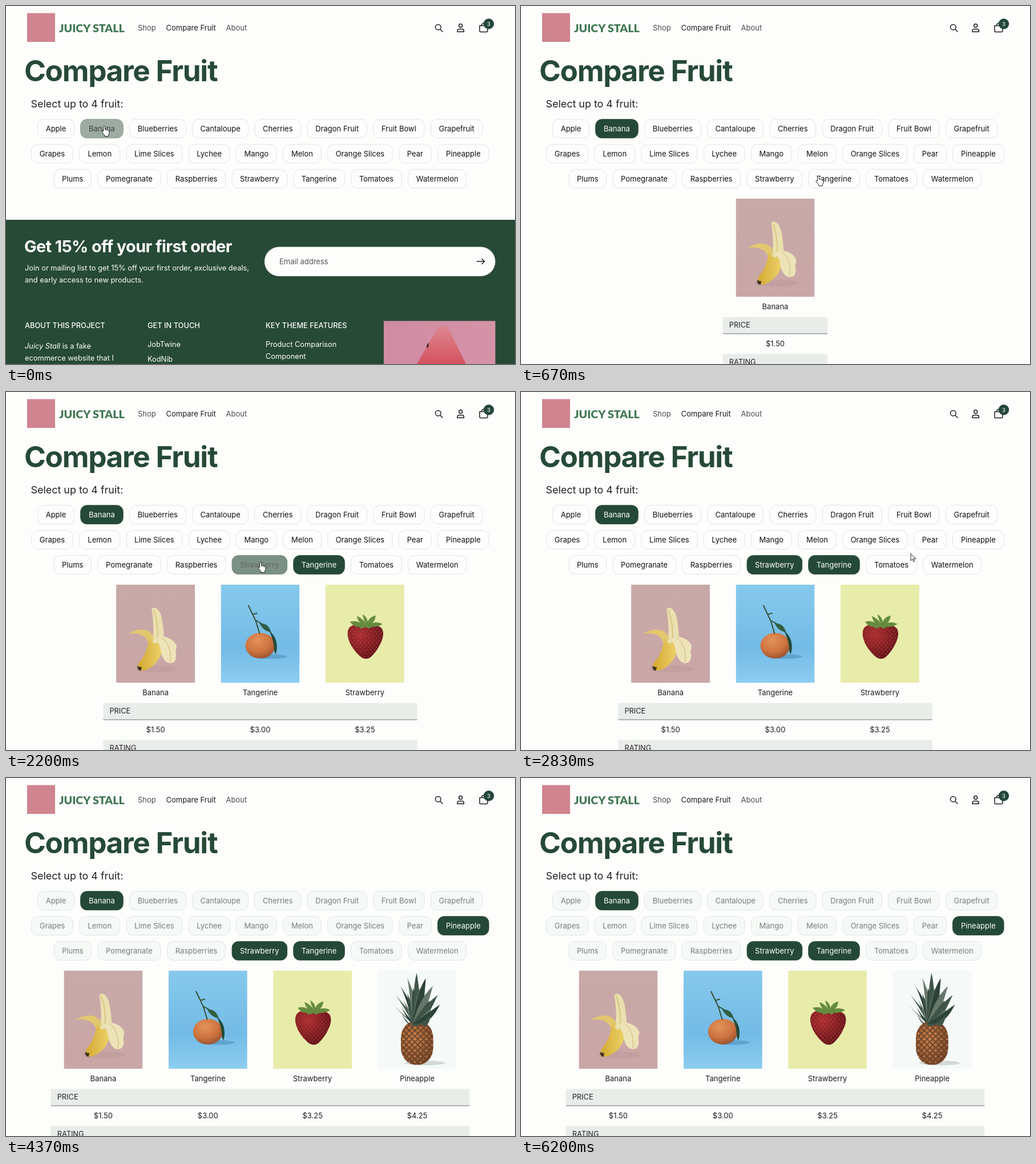
Animation, 892 px wide and 628 px high, one loop 6230 ms. Source, as an HTML page:

```html
<!DOCTYPE html>
<html lang="en">
<head>
<meta charset="utf-8">
<title>Compare Fruit</title>
<style>
  html, body { margin: 0; width: 100%; height: 100%; overflow: hidden; background: #fdfdfb; }
  svg { display: block; width: 892px; height: 628px; font: 12.8px Inter, Arial, sans-serif; font-optical-sizing: none; }
  .brand { font: 900 19.6px Lato, sans-serif; fill: #417854; }
  .bold { font-weight: 700; letter-spacing: -.02em; }
  .title { font-weight: 700; letter-spacing: -.025em; }
  .mid { text-anchor: middle; }
  .caps { font-weight: 500; }
  .line { fill: none; stroke: #1c1c1c; stroke-width: 1.5; stroke-linecap: round; stroke-linejoin: round; }
</style>
</head>
<body>
<svg id="stage" viewBox="0 0 892 628">
  <defs>
    <linearGradient id="rose" x2="0" y2="1"><stop stop-color="#c7a9a7"/><stop offset="1" stop-color="#caa6a6"/></linearGradient>
    <linearGradient id="sky" x2="0" y2="1"><stop stop-color="#86c9ec"/><stop offset=".65" stop-color="#73bbe6"/><stop offset="1" stop-color="#8dcdf0"/></linearGradient>
    <linearGradient id="pink" x2="1" y2="0"><stop stop-color="#cf8ba1"/><stop offset="1" stop-color="#d593a8"/></linearGradient>
    <linearGradient id="flesh" x2="0" y2="1"><stop stop-color="#dc8790"/><stop offset="1" stop-color="#d5525f"/></linearGradient>
    <linearGradient id="peel" x2="1" y2="0"><stop stop-color="#d3a932"/><stop offset="1" stop-color="#ecd069"/></linearGradient>
    <radialGradient id="orange" cx=".4" cy=".3" r=".75"><stop stop-color="#e4925a"/><stop offset=".6" stop-color="#cd733f"/><stop offset="1" stop-color="#96502f"/></radialGradient>
    <radialGradient id="berry" cx=".35" cy=".3" r=".75"><stop stop-color="#ae2e30"/><stop offset="1" stop-color="#64131a"/></radialGradient>
    <radialGradient id="rind" cx=".4" cy=".4" r=".7"><stop stop-color="#c87b42"/><stop offset="1" stop-color="#7d4427"/></radialGradient>
    <pattern id="seeds" width="7" height="8" patternUnits="userSpaceOnUse"><path d="M2 1v1.4M5.5 5v1.4" stroke="#c27a62" stroke-width=".9"/></pattern>
    <pattern id="scales" width="10" height="10" patternUnits="userSpaceOnUse"><path d="M0 0l10 10M10 0L0 10" stroke="#5c3f2a" stroke-width="1.5"/><circle cx="5" cy="0" r="1.3" fill="#e0aa78"/></pattern>
  </defs>

  <rect width="892" height="628" fill="#fdfdfb"/>
  <rect x="37" y="12.5" width="49" height="50.5" fill="#d0848f"/>
  <text class="brand" x="93" y="46">JUICY STALL</text>
  <g font-size="13" fill="#4b4b4b">
    <text x="231" y="42.5">Shop</text>
    <text x="280.5" y="42.5" fill="#1b1b1b">Compare Fruit</text>
    <text x="385.5" y="42.5">About</text>
  </g>
  <g class="line">
    <circle cx="757.3" cy="37.2" r="4.8"/><path d="M761 41l4 4"/>
    <circle cx="796.7" cy="34.6" r="3"/><path d="M791 45.3v-1.5q0-3.3 3.3-3.3h4.8q3.3 0 3.3 3.3v1.5z"/>
    <path d="M830 34.6h14v9q0 2-2 2h-10q-2 0-2-2zM833.5 34.5q0-4 3.5-4t3.5 4"/>
  </g>
  <circle cx="846" cy="31.3" r="9.2" fill="#23483a"/>
  <text class="mid" x="846" y="34.8" font-size="9.6" fill="#fff">3</text>
  <text class="title" x="32" y="131.5" font-size="51.2" fill="#264a37">Compare Fruit</text>
  <text x="43.5" y="178" font-size="17.92" fill="#222">Select up to 4 fruit:</text>
  <g id="pills" class="mid" font-size="13"></g>

  <g id="footer" fill="#fff">
    <rect y="375" width="892" height="253" fill="#274a36"/>
    <text class="bold" x="32" y="432" font-size="28.8">Get 15% off your first order</text>
    <text x="33" y="464">Join or mailing list to get 15% off your first order, exclusive deals,</text>
    <text x="33" y="484.5">and early access to new products.</text>
    <rect x="453" y="422.5" width="404.5" height="51.5" rx="25.7" fill="#fdfdfb"/>
    <text x="479" y="452.5" fill="#555" font-size="13">Email address</text>
    <path class="line" d="M825.5 448h13M834 443.5l4.5 4.5-4.5 4.5"/>
    <g class="caps">
      <text x="33" y="564.5">ABOUT THIS PROJECT</text>
      <text x="248" y="564.5">GET IN TOUCH</text>
      <text x="455" y="564.5">KEY THEME FEATURES</text>
    </g>
    <text x="33" y="600.5"><tspan font-style="italic">Juicy Stall</tspan> is a fake</text>
    <text x="33" y="621.5">ecommerce website that I</text>
    <text x="248" y="598">JobTwine</text>
    <text x="248" y="624">KodNib</text>
    <text x="455" y="598">Product Comparison</text>
    <text x="455" y="619">Component</text>
    <rect x="662" y="552.5" width="195.5" height="76" fill="url(#pink)"/>
    <path d="M720 628L755 567q3-5 8-5h5q5 0 8 5L806 628z" fill="url(#flesh)"/>
    <path d="M737 599q0-6 4-8l-1 8z" fill="#3a2328"/>
  </g>

  <g id="table">
    <rect class="band" y="545.5" height="29" fill="#e9edea"/>
    <rect class="band" y="574.4" height="1" fill="#68716c"/>
    <rect class="band" y="610.5" height="18" fill="#e9edea"/>
    <g id="labels" fill="#222"><text x="11" y="564.3">PRICE</text><text x="11" y="628.5">RATING</text></g>
  </g>
  <g id="products" class="mid" font-size="13" fill="#1d1d1d"></g>
  <path id="cursor" fill="#fff" stroke="#222" stroke-width="1" stroke-linejoin="round"/>
</svg>
<script>
const LOOP = 6230, COLUMN = 183.4, CENTER = 445.5, GAP = 11.2, PILL_H = 32.8;
const $ = id => document.getElementById(id);

const rows = [
  [55.5, 198.8, 'Apple 64,Banana 74.5,Blueberries 99,Cantaloupe 98,Cherries 81,Dragon Fruit 104.5,Fruit Bowl 89.5,Grapefruit 90.5'],
  [44.5, 242.8, 'Grapes 73,Lemon 71,Lime Slices 98,Lychee 72,Mango 71,Melon 67,Orange Slices 113.5,Pear 57,Pineapple 89.5'],
  [84, 286.8, 'Plums 65.5,Pomegranate 110.5,Raspberries 102.5,Strawberry 96.5,Tangerine 89.5,Tomatoes 89,Watermelon 102']
];

// Long inner leaves alternate with short ones, tips bending outwards.
const leaves = Array.from({ length: 19 }, (_, i) => {
  const a = (i - 9) * .125, len = 88 - Math.abs(i - 9) * 3.4 - (i % 2 ? 0 : 22);
  const x = 68 + Math.sin(a) * len * .8, y = 92 - Math.cos(a) * len;
  const c = ['#3f5548', '#66786a', '#2d4238'][i % 3];
  return `<path d="M61 93Q${62 + (x - 68) * .4} ${y + 22} ${x} ${y}Q${74 + (x - 68) * .5} ${y + 30} 76 93z" fill="${c}"/>`;
}).join('');

const heart = 'M39 82q2-12 17-12 13 0 20 0 15-2 23 7 5 8-1 23-8 18-20 28-8 5-17-2-16-14-21-31-2-7-1-13z';
const rind = '<rect x="40.5" y="88" width="56.5" height="77" rx="26" ry="30"';

const art = {
  Banana: `<rect width="138" height="172" fill="url(#rose)"/>
    <ellipse cx="70" cy="148" rx="38" ry="6" fill="#b28e8f" opacity=".3"/>
    <path d="M62 43q2-4 8-2 9 6 11 24 4 24 2 43l-24 2q8-22 6-38 0-14-3-29z" fill="#eadfae"/>
    <path d="M65 44q10 24 7 60" fill="none" stroke="#d9c68a" stroke-width="2"/>
    <path d="M21 86q18-11 33-6 9 4 12 14l-8 18q-1-17-12-23-10-5-25-3z" fill="#e2c76f"/>
    <path d="M58 94q-3 23-13 36-9 10-6 17 4 6 14 2 17-8 24-23 4-10 1-28-10 12-20-4z" fill="url(#peel)"/>
    <path d="M70 98q3-9 13-7 16 3 22 14 2 4-1 12 3 13-3 19-7 4-14-1-8-8-9-20-1-10-8-17z" fill="#ede3b8"/>
    <path d="M80 93q17 12 15 43" fill="none" stroke="#dac58c" stroke-width="1.5"/>
    <path d="M37 143l8 2-2 6q-6-1-6-8z" fill="#44351d"/>`,
  Tangerine: `<rect width="138" height="172" fill="url(#sky)"/>
    <ellipse cx="86" cy="126" rx="30" ry="4" fill="#3f7fae" opacity=".45"/>
    <ellipse cx="69" cy="107" rx="26" ry="22.5" fill="url(#orange)"/>
    <path d="M48 36l13 27 7 23M56 52l8-2M60 62l14 8" fill="none" stroke="#385036" stroke-width="2"/>
    <path d="M68 68q16-1 20 16l-8-3q-8-4-12-13z" fill="#315f43"/>
    <path d="M84 80q10 8 13 19 3 13-1 23-3-4-3-15-2-14-9-27z" fill="#234a38"/>`,
  Strawberry: `<rect width="138" height="172" fill="#e8ecaa"/>
    <path d="${heart}" fill="url(#berry)"/>
    <path d="${heart}" fill="url(#seeds)"/>
    <path d="M71 68q-5-8-6-16 8 5 9 13 4-9 14-11-1 9-6 13 9-3 18 2-9 6-19 5-5 5-11 0-7 5-12 0-9 0-15-9 11-3 18 2-5-5-6-12 10 4 16 13z" fill="#668b40"/>`,
  Pineapple: `<rect width="138" height="172" fill="#f5faf8"/>
    <ellipse cx="82" cy="162" rx="36" ry="4" fill="#d3dad6"/>
    ${rind} fill="url(#rind)"/>${rind} fill="url(#scales)"/>${leaves}`
};

const picks = [
  { name: 'Banana', price: '$1.50', hover: -500, click: 110 },
  { name: 'Tangerine', price: '$3.00', hover: 665, click: 1000 },
  { name: 'Strawberry', price: '$3.25', hover: 1840, click: 2150 },
  { name: 'Pineapple', price: '$4.25', hover: 3100, click: 3350 }
];
const allPicked = picks[3].click;

// [time, x, y] of the pointer tip
const track = [
  [0, 172, 211], [230, 172, 211], [670, 521, 298], [800, 537, 304.5], [1550, 537, 304.5],
  [1950, 446, 299], [2450, 446, 299], [2830, 683, 283.5], [3200, 810, 251], [3850, 810, 251], [4300, 800, 640]
];
const HAND = 'M-1.5 1.2a1.5 1.5 0 0 1 3 0v5l1.2-.6 1.5.9 1.4-.3 1.2 1 1.3.1.7 1.2v4l-1.5 3v2h-6.5v-1.6l-4.7-6.2c-.6-1.4 1-2 1.9-1l.5.6z';
const ARROW = 'M0 0v12.5l3-2.8 2 4.6 2-.9-2-4.5h4z';

const clamp = v => Math.max(0, Math.min(1, v));
const smooth = v => v * v * (3 - 2 * v);
const ramp = (t, start) => smooth(clamp((t - start) / 150));
const mix = (a, b, k) => `rgb(${a.map((v, i) => Math.round(v + (b[i] - v) * k))})`;

const PAPER = [253, 253, 252], INK = [17, 17, 17], GREEN = [37, 73, 55], EDGE = [223, 227, 232];
const FADED = [246, 250, 247], FADED_INK = [117, 124, 120], WHITE = [255, 255, 255];

const pills = [];
for (const [start, y, list] of rows) {
  let x = start;
  for (const item of list.split(',')) {
    const [, name, size] = item.match(/(.+) ([\d.]+)/), w = +size;
    pills.push({ name, x, y, w, pick: picks.find(p => p.name === name) });
    x += w + GAP;
  }
}
$('pills').innerHTML = pills.map(p =>
  `<g><rect x="${p.x}" y="${p.y}" width="${p.w}" height="${PILL_H}" rx="11"/><text x="${p.x + p.w / 2}" y="${p.y + 21}">${p.name}</text></g>`).join('');
pills.forEach((p, i) => [p.box, p.label] = $('pills').children[i].children);

$('products').innerHTML = picks.map(p =>
  `<g><svg x="22.7" y="338" width="138" height="172">${art[p.name]}</svg>
   <text x="${COLUMN / 2}" y="532">${p.name}</text><text x="${COLUMN / 2}" y="597">${p.price}</text></g>`).join('');
const bands = document.querySelectorAll('.band');

function pointerAt(t) {
  const i = track.findIndex(k => k[0] > t);
  if (i < 0) return null;
  const [t0, x0, y0] = track[i - 1], [t1, x1, y1] = track[i];
  const k = smooth((t - t0) / (t1 - t0));
  return [x0 + (x1 - x0) * k, y0 + (y1 - y0) * k];
}

function drawPills(t) {
  const off = ramp(t, allPicked);
  for (const { pick, box, label } of pills) {
    const k = pick ? .45 * ramp(t, pick.hover) + .55 * ramp(t, pick.click) : off;
    box.setAttribute('fill', mix(PAPER, pick ? GREEN : FADED, k));
    box.setAttribute('stroke', mix(EDGE, pick ? GREEN : EDGE, k));
    label.setAttribute('fill', pick ? mix(INK, WHITE, k * k) : mix(INK, FADED_INK, k));
  }
}

function drawTable(t) {
  const count = picks.filter(p => t >= p.click).length;
  const left = CENTER - COLUMN * count / 2;
  $('footer').style.display = count ? 'none' : '';
  $('table').style.display = count ? '' : 'none';
  bands.forEach(b => { b.setAttribute('x', left); b.setAttribute('width', COLUMN * count); });
  $('labels').setAttribute('transform', `translate(${left})`);
  [...$('products').children].forEach((g, i) => {
    g.style.display = i < count ? '' : 'none';
    g.setAttribute('transform', `translate(${left + i * COLUMN})`);
  });
}

function drawCursor(t) {
  const at = pointerAt(t);
  $('cursor').style.display = at ? '' : 'none';
  if (!at) return;
  const [x, y] = at;
  const over = pills.some(p => x > p.x && x < p.x + p.w && y > p.y && y < p.y + PILL_H);
  $('cursor').setAttribute('d', over ? HAND : ARROW);
  $('cursor').setAttribute('transform', `translate(${x} ${y})`);
}

function render(t) {
  drawPills(t);
  drawTable(t);
  drawCursor(t);
}

const began = performance.now();
function tick() {
  render((performance.now() - began) % LOOP);
  requestAnimationFrame(tick);
}
tick();
</script>
</body>
</html>
```
